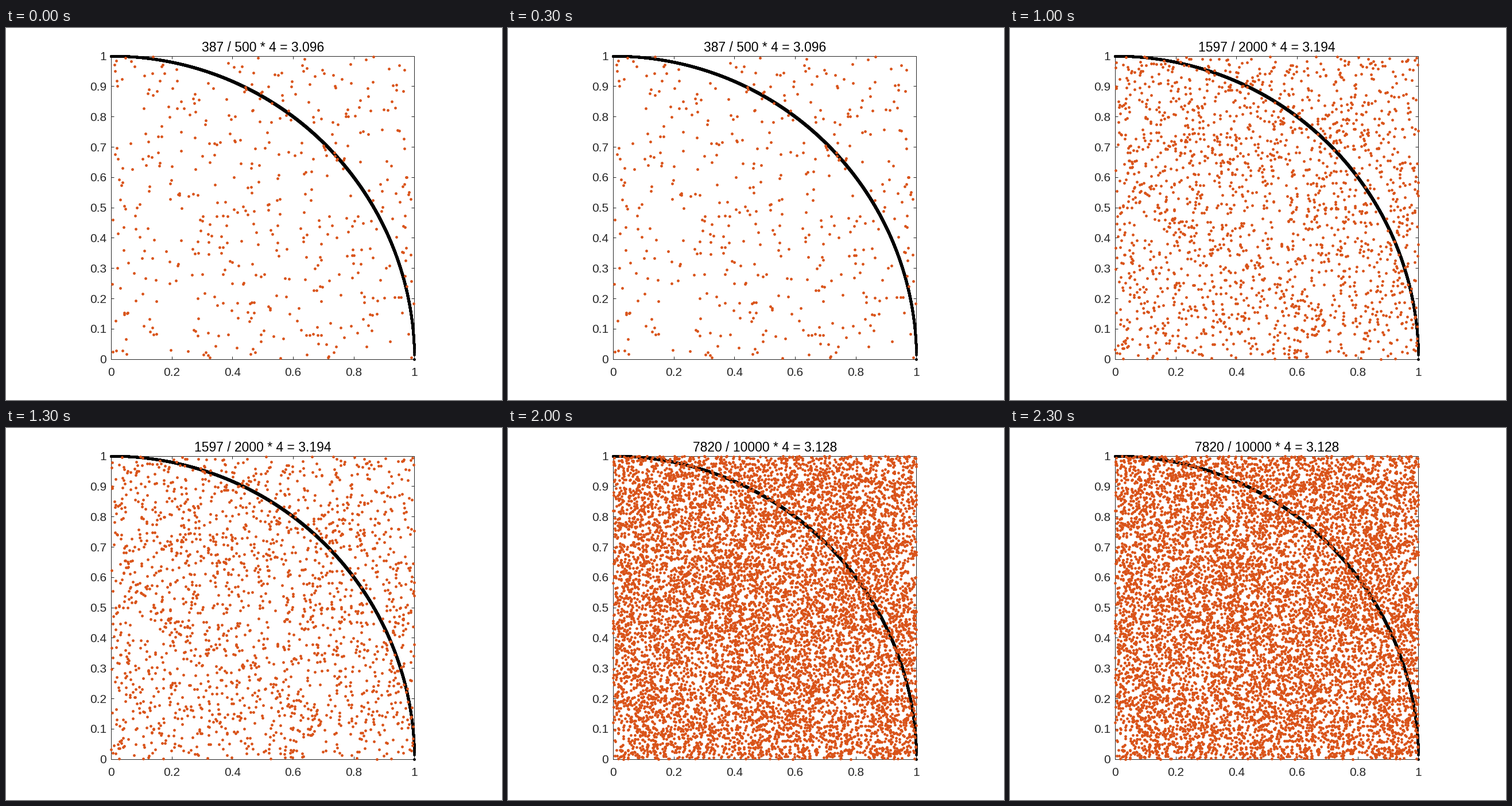
A matplotlib script for the animation above (2.5 s loop, 864 px wide and 648 px high).

```python
import numpy as np
import matplotlib.pyplot as plt
from matplotlib.animation import FuncAnimation

# Monte Carlo estimate of pi: (points drawn, points inside the quarter circle)
RUNS = [(500, 387), (1000, 783), (2000, 1597), (5000, 3973), (10000, 7820)]
INTERVAL = 500

W, H, DPI = 864, 648, 144
LEFT, BOTTOM, SIDE = 183.1, 71.3, 528.1
INK = "#262626"
ORANGE = "#D95319"

plt.rcParams["font.family"] = "Liberation Sans"


def px(n):
    """Pixels to points."""
    return n * 72 / DPI


def sample(total, inside):
    """Uniform points in the unit square with a given number inside the arc."""
    rng = np.random.default_rng(total)
    pts = rng.random((4 * total, 2))
    hit = (pts ** 2).sum(axis=1) < 1
    return np.concatenate([pts[hit][:inside], pts[~hit][:total - inside]])


def dots(x, y, color, zorder):
    line, = ax.plot(x, y, "o", ms=px(4.8), mew=0, color=color,
                    zorder=zorder, clip_on=False)
    return line


fig = plt.figure(figsize=(W / DPI, H / DPI), dpi=DPI, facecolor="white")
ax = fig.add_axes([LEFT / W, BOTTOM / H, SIDE / W, SIDE / H])
ax.set(xlim=(0, 1), ylim=(0, 1),
       xticks=np.linspace(0, 1, 6), yticks=np.linspace(0, 1, 11))
for axis in (ax.xaxis, ax.yaxis):
    axis.set_major_formatter(lambda v, _: f"{v:.1g}")
ax.tick_params(direction="in", top=True, right=True, length=px(5.3),
               width=px(1), color=INK, labelcolor=INK, labelsize=px(20.83))
ax.tick_params(axis="x", pad=px(14.5))
ax.tick_params(axis="y", pad=px(8))
for spine in ax.spines.values():
    spine.set(linewidth=px(1), edgecolor=INK)

title = ax.set_title("", fontsize=px(22.92), color="black", pad=px(7.5))

arc_x = np.linspace(0, 1, 10001)
dots(arc_x, np.sqrt(1 - arc_x ** 2), "black", 5)
cloud = dots([], [], ORANGE, 6)

clouds = [sample(*run) for run in RUNS]


def update(i):
    total, inside = RUNS[i]
    cloud.set_data(*clouds[i].T)
    title.set_text(f"{inside} / {total} * 4 = {4 * inside / total:g}")
    return cloud, title


anim = FuncAnimation(fig, update, frames=len(RUNS), interval=INTERVAL,
                     repeat=True, repeat_delay=0, blit=False)
plt.show()
```
